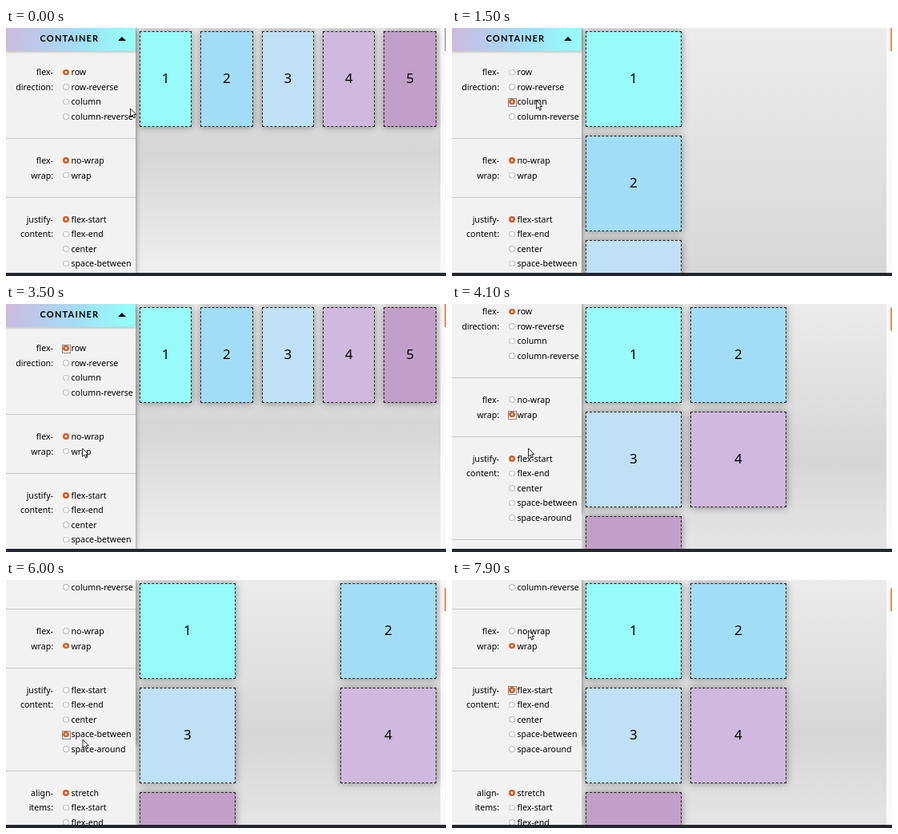
Animation of 550 by 311 pixels, one loop 8000 ms. Source, as an HTML page:

```html
<!DOCTYPE html>
<html lang="en">
<head>
<meta charset="utf-8">
<title>Flexbox playground</title>
<style>
  * { box-sizing: border-box; margin: 0; }
  html, body { width: 100%; height: 100%; overflow: hidden; }
  body { font: 10.6px/18.5px "Noto Sans", sans-serif; color: #000; }
  #stage { position: relative; width: 550px; height: 311px; overflow: hidden; background: #fafafa; }
  #cards {
    position: absolute; left: 161.3px; top: -1.8px; width: 382px; min-height: 312px;
    display: flex; align-items: flex-start; align-content: flex-start;
    background: linear-gradient(#ececec, #d6d6d6, #f0f0f0);
  }
  #cards div {
    flex: 0 1 120px; width: 120px; height: 120px; margin: 5.5px;
    display: flex; align-items: center; justify-content: center;
    border: 1px dashed #222; box-shadow: 0 0 9px rgba(0, 0, 0, .4); font-size: 17px;
  }
  #panel { position: absolute; left: 0; top: 0; width: 162px; height: 309px; box-shadow: 0 0 6px rgba(0, 0, 0, .5); }
  #content { position: relative; background: #f2f2f2; }
  header {
    height: 28.8px; padding: 4px 0 0 42.5px; position: relative;
    font: bold 11px/18.5px Lato, sans-serif; letter-spacing: 1.2px;
    background: linear-gradient(100deg, #cfb9df, #a2ddf8 55%, #96fbf9 90%);
    box-shadow: 0 1px 3px rgba(0, 0, 0, .25);
  }
  header::after {
    content: ""; position: absolute; left: 140px; top: 11px;
    border: 5px solid transparent; border-top: 0; border-bottom: 5.5px solid #000;
  }
  section { display: flex; padding: 17.6px 0 18.1px; border-bottom: 1px solid #c6c6c6; white-space: nowrap; }
  .name { width: 59px; margin-right: 11px; text-align: right; }
  .option { display: block; position: relative; padding-left: 11.5px; }
  .option::before {
    content: ""; position: absolute; left: 1.2px; top: 5.4px; width: 7.4px; height: 7.4px;
    border-radius: 50%; background: radial-gradient(circle, #fff 2.6px, #bbb 3.2px);
  }
  .checked::before { background: radial-gradient(circle, #fff .8px, #d4602c 1.8px); }
  .focus::after {
    content: ""; position: absolute; left: 0; top: 4.4px; width: 9px; height: 9px;
    border: 1px solid #888;
  }
  #thumb { position: absolute; left: 547.5px; top: 0; width: 2.5px; height: 29px; }
  #bar { position: absolute; left: 0; top: 307px; width: 550px; height: 4px; background: #25272e; }
  #cursor { position: absolute; left: 0; top: 0; overflow: visible; }
</style>
</head>
<body>
<div id="stage">
  <div id="cards"></div>
  <div id="panel"><div id="content"><header>CONTAINER</header></div></div>
  <div id="thumb"></div>
  <div id="bar"></div>
  <svg id="cursor" width="9" height="14">
    <path d="M.5 0V10.3L3 8.2L4.7 12L6.4 11.3L4.8 7.6H7.8Z" fill="#fff" stroke="#111" stroke-width=".9"/>
  </svg>
</div>
<script>
const $ = id => document.getElementById(id);
const groups = {
  'flex-direction': ['row', 'row-reverse', 'column', 'column-reverse'],
  'flex-wrap': ['no-wrap', 'wrap'],
  'justify-content': ['flex-start', 'flex-end', 'center', 'space-between', 'space-around'],
  'align-items': ['stretch', 'flex-start', 'flex-end']
};
// Press time, property, chosen value; the choice applies one tick after the press
const clicks = [
  [500, 'flex-direction', 'row-reverse'],
  [1400, 'flex-direction', 'column'],
  [2100, 'flex-direction', 'column-reverse'],
  [2900, 'flex-direction', 'row'],
  [3700, 'flex-wrap', 'wrap'],
  [4800, 'justify-content', 'flex-end'],
  [5400, 'justify-content', 'center'],
  [5800, 'justify-content', 'space-between'],
  [6500, 'justify-content', 'space-around'],
  [7300, 'justify-content', 'flex-start']
];
// Time, x, y
const path = [
  [0, 155, 101], [300, 110, 72], [600, 110, 72], [900, 105, 91], [1500, 105, 91],
  [1700, 100, 108], [2300, 100, 108], [2700, 96, 57], [3100, 96, 57], [3500, 95, 181],
  [4100, 95, 181], [4500, 98, 153], [4900, 98, 153], [5100, 98, 171], [5500, 98, 171],
  [5700, 96, 190], [5900, 96, 190], [6100, 95, 210], [6300, 95, 211], [6700, 95, 211],
  [7100, 96, 136], [7500, 96, 136], [7900, 95, 63]
];
const scroll = [[3900, 0], [4100, 46], [4300, 102]];
const TICK = 100, LOOP = 8000;

function sample(keys, t) {
  const next = keys.findIndex(key => key[0] > t);
  if (next < 0) return keys[keys.length - 1].slice(1);
  if (next === 0) return keys[0].slice(1);
  const a = keys[next - 1], b = keys[next], k = (t - a[0]) / (b[0] - a[0]);
  return a.slice(1).map((v, i) => v + (b[i + 1] - v) * k);
}

['#96fbf9', '#a2ddf8', '#bfe0f5', '#cfb9df', '#c29fc8'].forEach((color, i) => {
  $('cards').innerHTML += `<div style="background:${color}">${i + 1}</div>`;
});
for (const [prop, values] of Object.entries(groups)) {
  const options = values.map(v => `<span class="option" data-prop="${prop}" data-value="${v}">${v}</span>`);
  $('content').innerHTML +=
    `<section><div class="name">${prop.replace('-', '-<br>')}:</div><div>${options.join('')}</div></section>`;
}
const options = [...document.querySelectorAll('.option')];

function render(t) {
  const chosen = {};
  for (const prop in groups) chosen[prop] = groups[prop][0];
  let focus = null;
  for (const [time, prop, value] of clicks) {
    if (t >= time) focus = null;
    if (t >= time + TICK) {
      chosen[prop] = value;
      focus = prop + value;
    }
  }
  for (const option of options) {
    const { prop, value } = option.dataset;
    option.classList.toggle('checked', chosen[prop] === value);
    option.classList.toggle('focus', focus === prop + value);
  }
  const style = $('cards').style;
  style.flexDirection = chosen['flex-direction'];
  style.flexWrap = chosen['flex-wrap'].replace('no-', 'no');
  style.justifyContent = chosen['justify-content'];

  const [offset] = sample(scroll, t), [x, y] = sample(path, t);
  $('panel').style.transform = `translateY(${-offset}px)`;
  $('thumb').style.transform = `translateY(${offset * .1}px)`;
  $('thumb').style.background = t < 600 ? '#b4b4b4' : '#f08a60';
  $('cursor').style.transform = `translate(${x}px, ${y}px)`;
}

function loop() {
  const t = performance.now() % LOOP;
  render(t - t % TICK);
  requestAnimationFrame(loop);
}
loop();
</script>
</body>
</html>
```
